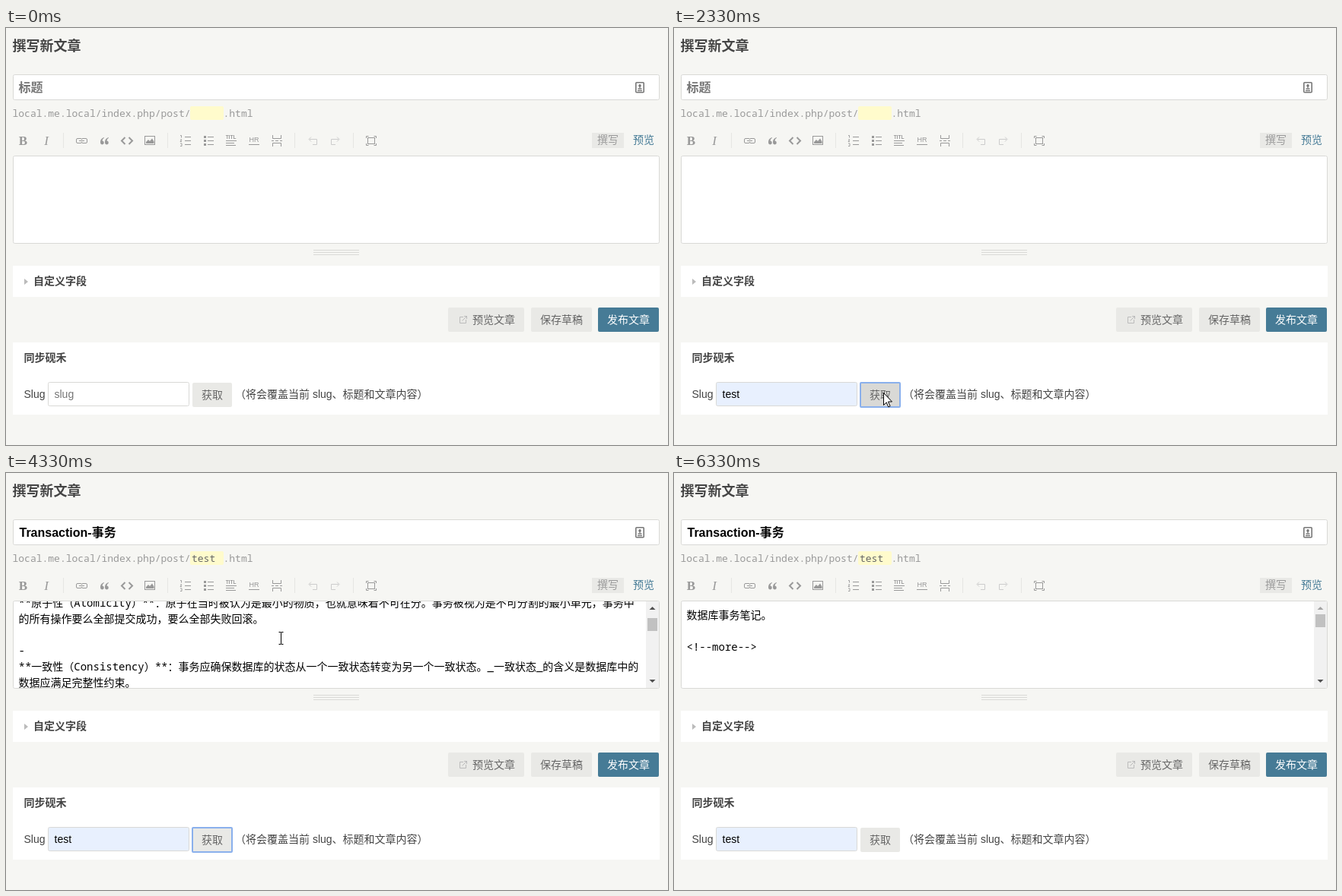
An HTML page that plays this animation: 870 px wide and 549 px high, repeating every 6540 ms.

```html
<!DOCTYPE html>
<html lang="zh-CN">
<head>
<meta charset="utf-8">
<title>撰写新文章</title>
<style>
html, body { margin: 0; width: 100%; height: 100%; overflow: hidden; background: #f6f6f3; }
svg { display: block; width: 870px; height: 549px; }
text {
  font: 14px "Liberation Sans", "Noto Sans CJK SC", "Noto Sans CJK", sans-serif;
  fill: #444; white-space: pre; text-spacing-trim: space-all;
}
.bold { font-weight: 700; }
.big { font-size: 18px; }
.title { font-size: 16px; font-weight: 700; }
.mono { font-family: "Noto Sans Mono", "Noto Sans CJK SC", "Noto Sans CJK", monospace; }
.url { font-size: 13px; fill: #999; }
.doc text { fill: #000; }
.label { fill: #666; }
.field { fill: #fff; stroke: #d9d9d6; }
.button { fill: #e9e9e6; }
.ring { fill: none; stroke: #8ab0ec; stroke-width: 2; }
.icons { fill: none; stroke: #999; }
.icons text { fill: #999; stroke: none; text-anchor: middle; }
.icons .serif { font: 17px "Liberation Serif", serif; }
.icons .solid { fill: #999; stroke: none; }
</style>
</head>
<body>
<svg viewBox="0 0 870 549" xmlns="http://www.w3.org/2000/svg">
  <defs><clipPath id="view"><rect x="10" y="169" width="831" height="114"/></clipPath></defs>
  <rect width="870" height="549" fill="#f6f6f3"/>
  <text class="bold big" x="8.5" y="30">撰写新文章</text>

  <rect class="field" x="9.5" y="61.5" width="849" height="33" rx="2"/>
  <text id="title" class="title" x="17" y="84"></text>
  <g fill="none" stroke="#777" stroke-width="1.6">
    <rect x="827.8" y="71.8" width="10.4" height="13" rx="1"/>
    <path d="M830 82.5h6M830.5 80h5M833 74v5" stroke-width="1.3"/>
    <circle cx="833" cy="76" r="1" fill="#777"/>
  </g>

  <text class="mono url" x="8.5" y="117">local.me.local/index.php/post/</text>
  <rect x="242" y="103" width="44" height="18" rx="2" fill="#fffbcc"/>
  <text id="slug" class="mono url" x="244" y="117" style="fill:#666">test</text>
  <text class="mono url" x="285.5" y="117">.html</text>

  <g class="icons">
    <path d="M75.5 138v20M212.5 138v20M379.5 138v20M456.5 138v20" stroke="#e6e6e3"/>
    <text class="serif" x="22.5" y="154" style="font-weight:600">B</text>
    <text class="serif" x="53" y="154" style="font-style:italic">I</text>
    <path d="M98 145.5h-4q-1.500 0-1.500 1.500v3q0 1.500 1.500 1.500h4q1.500 0 1.500-1.500M101 145.500h4q1.500 0 1.500 1.500v3q0 1.500-1.500 1.500h-4q-1.500 0-1.500-1.500M98 145.500q1.500 0 1.500 1.500M101 145.500q-1.500 0-1.500 1.500M96 148.500h7"/>
    <path class="solid" d="M128.500 144q-5 2-4.500 7a2.400 2.400 0 1 0 2.500-2.400q0-2.600 2.500-3.800zM134.500 144q-5 2-4.500 7a2.400 2.400 0 1 0 2.500-2.400q0-2.600 2.500-3.800z"/>
    <path d="M156.500 144l-4.500 4.500 4.500 4.500M161.500 144l4.500 4.500-4.500 4.500" stroke-width="2"/>
    <rect x="182.500" y="142.500" width="13" height="11"/>
    <path class="solid" d="M184 152v-2l3-3 2 2 3-3.500 2.500 4V152z"/>
    <path d="M235 143.500h8M235 148.500h8M235 153.500h8"/>
    <path d="M229 141.500h1.500v3M229 147h2l-2 2.500h2M229 152h2v3.500h-2" stroke-width=".9"/>
    <path d="M265 143.500h8M265 148.500h8M265 153.500h8"/>
    <path d="M260 143.500h3M260 148.500h3M260 153.500h3" stroke-width="3"/>
    <text x="295.500" y="146" style="font-size:6.500px;font-weight:700">TITL</text>
    <path d="M289 148.500h14M289 151.500h11M289 154.500h13"/>
    <text x="326" y="150" style="font-size:9px">HR</text>
    <path d="M319 153.500h14"/>
    <path d="M350.500 141v4.500h11V141M350.500 156v-4.500h11v4.500M349 148.500h3M354 148.500h4M360 148.500h3"/>
    <g stroke="#ccc">
      <path d="M399 146.500h9.500v7H403M401 143.500l-3 3 3 3"/>
      <path d="M437 146.500h-9.500v7h5.500M435 143.500l3 3-3 3"/>
    </g>
    <rect x="475.500" y="144.500" width="9" height="8"/>
    <path d="M473.500 145v-2.500h3M483.500 142.500h3v2.500M486.500 152v2.500h-3M476.500 154.500h-3V152"/>
  </g>
  <rect class="button" x="770" y="138" width="42" height="20"/>
  <text x="777" y="152" style="fill:#999">撰写</text>
  <text x="824" y="152" style="fill:#467b96">预览</text>

  <rect class="field" x="9.5" y="168.5" width="849" height="115" rx="2"/>
  <g clip-path="url(#view)"><g id="doc" class="doc"></g></g>
  <g id="bar">
    <rect x="841" y="169" width="17" height="114" fill="#f1f1f1"/>
    <path id="up" d="M845.500 180h8l-4-4z"/>
    <path d="M845.500 272h8l-4 4z" fill="#505050"/>
    <rect id="thumb" x="843" width="13" height="17" fill="#c1c1c1"/>
  </g>
  <path d="M404 292.500h60M404 295.500h60M404 298.500h60" stroke="#d9d9d6"/>

  <rect x="9" y="313" width="850" height="41" fill="#fff"/>
  <path d="M24 330v8l5-4z" fill="#bbb"/>
  <text class="bold" x="36" y="338">自定义字段</text>

  <rect class="button" x="581" y="368" width="100" height="32" rx="2"/>
  <path d="M601 380.500h-4.500v8h8V384M602 379.500h3.500v3.500M605.500 379.500l-6 6" fill="none" stroke="#bbb"/>
  <text class="label" x="613" y="389">预览文章</text>
  <rect class="button" x="690" y="368" width="80" height="32" rx="2"/>
  <text class="label" x="702" y="389">保存草稿</text>
  <rect x="778" y="368" width="80" height="32" rx="2" fill="#467b96"/>
  <text x="790" y="389" style="fill:#fff">发布文章</text>

  <rect x="9" y="414" width="850" height="95" fill="#fff"/>
  <text class="bold" x="23.5" y="439">同步砚禾</text>
  <text x="23.500" y="487">Slug</text>
  <rect id="input" class="field" x="55.500" y="466.500" width="185" height="31" rx="2"/>
  <rect id="inputRing" class="ring" x="55" y="466" width="186" height="32" rx="1"/>
  <text id="value" x="63.500" y="487"></text>
  <path id="caret" stroke="#000"/>
  <rect id="fetch" x="245" y="467" width="52" height="32" rx="2"/>
  <rect id="fetchRing" class="ring" x="245" y="467" width="52" height="32" rx="1"/>
  <text class="label" x="257" y="488">获取</text>
  <text x="301" y="487">（将会覆盖当前 slug、标题和文章内容）</text>

  <g id="popup">
    <rect x="55.500" y="498.500" width="490" height="43.500" fill="#fff" stroke="#dadada"/>
    <rect id="option" x="56" y="506" width="489" height="29" fill="#eee"/>
    <text x="64" y="525" style="fill:#222">test</text>
  </g>

  <g id="cursor">
    <path id="arrow" d="M.5 .5v16l3.700-3.600 2.600 6 2.300-1-2.600-5.900h5z" fill="#fff" stroke="#000"/>
    <path id="beam" d="M-3 -7.500h2.500l.5 .5 .5-.5H3M0 -7V8M-3 8.500h2.500l.5-.5 .5 .5H3" fill="none" stroke="#000"/>
  </g>
</svg>
<script>
const LOOP = 6540, FPS = 15;
const $ = id => document.getElementById(id);
const show = (id, on) => $(id).setAttribute("visibility", on ? "visible" : "hidden");
const set = (id, name, value) => $(id).setAttribute(name, value);

const lines = [
  "数据库事务笔记。", "", "<!--more-->", "", "",
  '[]()<a name="9f82401d"></a>', "# 事务", "",
  "数据库事务，是指作为单个逻辑工作单元的一系列操作，要么完全执行，要么完全不执行。事务中有的操作没有成功完成，整个事务",
  "中的所有操作都需要被回滚。", "",
  "![](https://cdn.yuque.com/yuque/0/2018/png/105818/1529842250403-c7f2c7b2-804b-4f94-bf09-",
  "12417355e1e2.png#width=429#alt=)", "",
  '[]()<a name="acid"></a>', "# ACID", "", "-",
  "**原子性（Atomicity）**：原子在当时被认为是最小的物质，也就意味着不可在分。事务被视为是不可分割的最小单元，事务中",
  "的所有操作要么全部提交成功，要么全部失败回滚。", "", "-",
  "**一致性（Consistency）**：事务应确保数据库的状态从一个一致状态转变为另一个一致状态。_一致状态_的含义是数据库中的",
  "数据应满足完整性约束。"
];
lines.forEach((line, i) => {
  const el = document.createElementNS("http://www.w3.org/2000/svg", "text");
  el.setAttribute("class", "mono");
  el.setAttribute("x", 16.5);
  el.setAttribute("y", 192 + 21 * i);
  el.textContent = line;
  $("doc").append(el);
});

// Keys are [tick, ...values], with 15 ticks per second.
const path = [
  [3, 329, 540], [6, 255, 508], [9, 172, 485], [11, 150, 483], [13, 150, 483],
  [16, 147, 498], [20, 141, 521], [25, 141, 521], [28, 175, 529], [31, 240, 502],
  [34, 274, 481], [39, 281, 474], [46, 281, 474], [47, 288, 455], [50, 316, 360],
  [53, 345, 232], [56, 355, 203], [58, 357, 205], [65, 361, 217], [67, 363, 219],
  [71, 380, 226], [74, 366, 262], [76, 334, 316], [79, 230, 400], [83, 38, 535]
];
const scroll = [
  [53, 0], [55, 75], [56, 100], [58, 186], [59, 200], [62, 300],
  [65, 394], [66, 400], [67, 385], [69, 255], [71, 108], [73, 15], [74, 0]
];

function at(keys, tick) {
  const next = keys.findIndex(k => k[0] > tick);
  if (next < 0) return keys[keys.length - 1].slice(1);
  if (next === 0) return keys[0].slice(1);
  const a = keys[next - 1], b = keys[next];
  const f = (tick - a[0]) / (b[0] - a[0]);
  return a.slice(1).map((v, i) => v + (b[i + 1] - v) * f);
}

const inside = (x, y, l, t, r, b) => x >= l && x < r && y >= t && y < b;

function draw(ms) {
  const tick = Math.floor((ms + 4) * FPS / 1000);
  const within = (a, b) => tick >= a && tick < b;
  const [x, y] = at(path, tick).map(Math.round);
  const top = Math.round(at(scroll, tick)[0]);

  const loaded = tick >= 37;
  $("title").textContent = loaded ? "Transaction-事务" : "标题";
  $("title").style.fill = loaded ? "#000" : "#757575";
  set("title", "x", loaded ? 17.5 : 16.5);
  for (const id of ["slug", "doc", "bar"]) show(id, loaded);
  set("doc", "transform", `translate(0 ${-top})`);
  set("thumb", "y", 186 + Math.round(top / 85));
  set("up", "fill", top ? "#505050" : "#a3a3a3");

  const picked = tick >= 17;
  $("value").textContent = picked ? "test" : "slug";
  $("value").style.fill = picked ? "#000" : "#757575";
  $("input").style.fill = picked ? "#e8f0fe" : "#fff";
  show("inputRing", within(10, 34));
  show("caret", within(10, 34));
  set("caret", "d", `M${picked ? 86.5 : 63.5} 474v16`);
  show("popup", within(13, 25));
  show("option", within(17, 25));

  const hover = tick === 47 || within(31, 47) && inside(x, y, 245, 467, 297, 499);
  set("fetch", "fill", hover ? "#d9d9d6" : "#e9e9e6");
  show("fetchRing", within(34, 95));

  const typing = inside(x, y, 10, 169, 841, 284) || inside(x, y, 55, 466, 241, 498);
  const visible = within(3, 84);
  show("arrow", visible && !typing);
  show("beam", visible && typing);
  set("cursor", "transform", `translate(${x + (typing ? .5 : 0)} ${y})`);
}

function frame() {
  draw(performance.now() % LOOP);
  requestAnimationFrame(frame);
}
frame();
</script>
</body>
</html>
```
